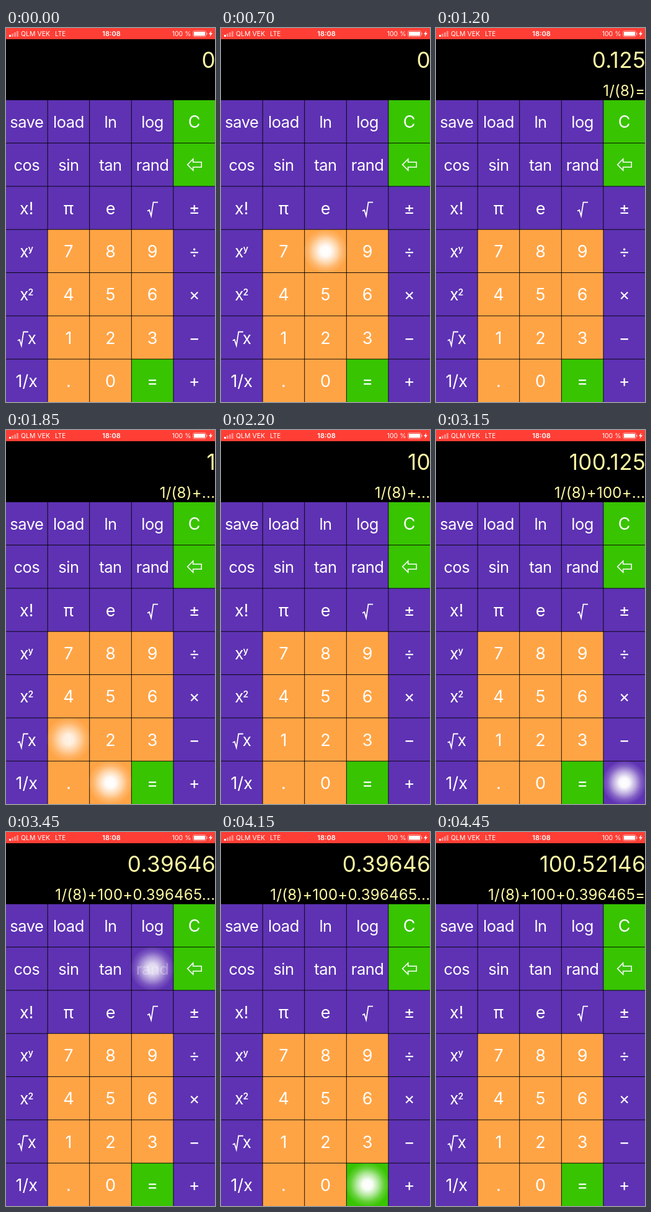
An HTML page with a canvas for the animation above (5.2 s loop, 337x600 px).

```html
<!DOCTYPE html>
<html lang="en">
<head>
<meta charset="utf-8">
<title>Calculator</title>
<style>
  html, body { margin: 0; height: 100%; overflow: hidden; background: #000; }
  canvas { display: block; width: 337px; height: 600px; }
</style>
</head>
<body>
<canvas id="stage"></canvas>
<script>
const WIDTH = 337, HEIGHT = 600, LOOP = 5200, STEP = 50;
const PURPLE = '#5e32b3', ORANGE = '#ffa445', GREEN = '#38c400';
const COL = 67.58, ROW = 69.3, TOP = 115.8, GAP = 0.9;

const KEYS = [
  ['save', 'load', 'ln', 'log', 'C'],
  ['cos', 'sin', 'tan', 'rand', '⇦'],
  ['x!', 'π', 'e', '√', '±'],
  ['x^y', '7', '8', '9', '÷'],
  ['x^2', '4', '5', '6', '×'],
  ['√x', '1', '2', '3', '−'],
  ['1/x', '.', '0', '=', '+']
];

// key, touch down, release, end of glow (ms)
const TAPS = [
  ['8', 700, 800, 1000],
  ['1/x', 900, 1000, 1200],
  ['+', 1650, 1700, 1850],
  ['1', 1700, 1750, 2000],
  ['0', 1850, 1950, 2200],
  ['0', 2250, 2350, 2600],
  ['+', 3050, 3150, 3350],
  ['rand', 3250, 3350, 3600],
  ['=', 4150, 4250, 4450]
];

// start (ms), value, expression
const SCREENS = [
  [0, '0', ''],
  [800, '8', ''],
  [1000, '0.125', '1/(8)='],
  [1700, '0.125', '1/(8)+...'],
  [1750, '1', '1/(8)+...'],
  [1950, '10', '1/(8)+...'],
  [2350, '100', '1/(8)+...'],
  [3150, '100.125', '1/(8)+100+...'],
  [3350, '0.39646', '1/(8)+100+0.396465...'],
  [4250, '100.52146', '1/(8)+100+0.396465=']
];

const canvas = document.getElementById('stage');
const ctx = canvas.getContext('2d');
const dpr = window.devicePixelRatio || 1;
canvas.width = WIDTH * dpr;
canvas.height = HEIGHT * dpr;
ctx.scale(dpr, dpr);

function rect(color, x, y, w, h) {
  ctx.fillStyle = color;
  ctx.fillRect(x, y, w, h);
}

function text(string, x, y, size, align = 'center', color = '#fff', weight = 400, spacing = 0) {
  ctx.font = `${weight} ${size}px Inter, Roboto, sans-serif`;
  ctx.letterSpacing = spacing + 'px';
  ctx.textAlign = align;
  ctx.fillStyle = color;
  ctx.fillText(string, x, y);
}

function stroke(path, x, y, width) {
  ctx.save();
  ctx.translate(x, y);
  ctx.strokeStyle = '#fff';
  ctx.lineWidth = width;
  ctx.stroke(new Path2D(path));
  ctx.restore();
}

function keyColor(key, row, col) {
  if (key === '=' || (col === 4 && row < 2)) return GREEN;
  return row > 2 && col > 0 && col < 4 ? ORANGE : PURPLE;
}

function drawLabel(key, x, y) {
  const base = y + 10;
  if (key === '⇦') {
    stroke('M-11 0L-2 -9V-4H11.5V4H-2V9Z', x, y, 1.6);
  } else if (key[0] === '√') {
    const left = key === '√' ? x : x - 6.5;
    stroke('M-8 4L-5 2.5L-2 12L1.5 -10H9', left, y + 1, 1.8);
    if (key === '√x') text('x', x + 8.5, base, 26);
  } else if (key[1] === '^') {
    text('x', x - 4, base, 26);
    text(key[2], x + 6.5, base - 8.5, 14, 'center', '#fff', 600);
  } else {
    const word = /^[a-z]{2}/.test(key);
    text(key, x, base, word ? 25.5 : 27, 'center', '#fff', 400, word ? -0.5 : 0);
  }
}

function drawGlow(x, y, strength) {
  const glow = ctx.createRadialGradient(x, y, 0, x, y, 36);
  [[0, 1], [0.22, 0.97], [0.5, 0.6], [0.75, 0.22], [1, 0]].forEach(([stop, alpha]) =>
    glow.addColorStop(stop, `rgba(255,255,255,${alpha * strength})`));
  rect(glow, x - 36, y - 36, 72, 72);
}

function drawStatusBar() {
  rect('#ff3e35', 0, 0, WIDTH, 18);
  for (let i = 0; i < 4; i++) {
    const h = 3 + i * 2;
    rect(i ? 'rgba(255,255,255,.4)' : '#fff', 5 + i * 4, 14 - h, 3, h);
  }
  text('QLM VEK', 24, 13, 10.5, 'left');
  text('LTE', 79, 13, 10, 'left');
  text('18:08', 170, 13, 11, 'center', '#fff', 600);
  text('100 %', 298.5, 13, 10.5, 'right');
  ctx.strokeStyle = 'rgba(255,255,255,.6)';
  ctx.lineWidth = 0.8;
  ctx.beginPath();
  ctx.roundRect(301.5, 4.5, 21, 9.5, 2.5);
  ctx.stroke();
  rect('#fff', 303, 6, 18, 6.5);
  rect('rgba(255,255,255,.6)', 323.3, 7.5, 1.2, 3.5);
  ctx.fillStyle = '#fff';
  ctx.fill(new Path2D('M331 4.5L327 10H329.5L328.5 14L333 8.3H330.3Z'));
}

function glowStrength(key, t) {
  return Math.max(0, ...TAPS.map(([name, down, up, end]) => {
    if (name !== key || t < down) return 0;
    const fade = Math.max(0, (t - up) / (end - up));
    return 1 - fade * fade;
  }));
}

function drawKeys(t) {
  const glows = [];
  KEYS.forEach((keys, row) => keys.forEach((key, col) => {
    const left = col * COL, top = TOP + row * ROW;
    const width = COL - GAP, height = ROW - GAP;
    rect(keyColor(key, row, col), left, top, width, height);
    const x = left + width / 2, y = top + height / 2;
    const strength = glowStrength(key, t);
    ctx.globalAlpha = 1 - 0.85 * strength;
    drawLabel(key, x, y);
    ctx.globalAlpha = 1;
    if (strength) glows.push([x, y, strength]);
  }));
  glows.forEach(glow => drawGlow(...glow));
}

function draw(now) {
  const t = Math.floor((now % LOOP) / STEP) * STEP;
  const [, value, expression] = SCREENS.findLast(([start]) => start <= t);
  rect('#000', 0, 0, WIDTH, HEIGHT);
  drawStatusBar();
  text(value, 338, 64, 35, 'right', '#fdf8a4', 400, 0.35);
  text(expression, 337.3, 109, 24, 'right', '#fdf8a4', 400, 0.25);
  drawKeys(t);
}

const start = performance.now();
function frame() {
  draw(performance.now() - start);
  requestAnimationFrame(frame);
}
frame();
</script>
</body>
</html>
```
